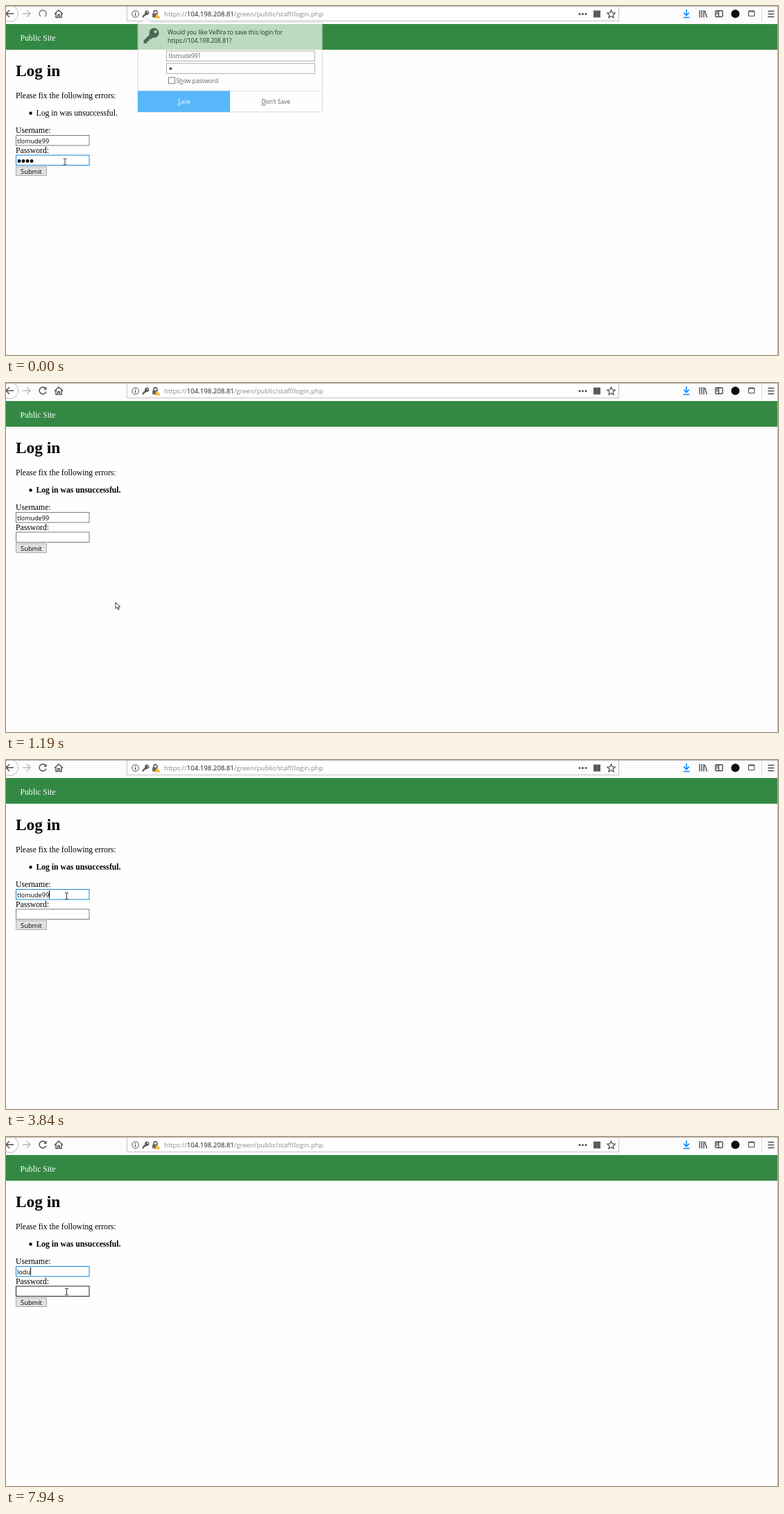
Recreate the animation shown at these times as an HTML page. Size 1113 by 503 pixels, loop 8000 ms.

```html
<!DOCTYPE html>
<html lang="en">
<head>
<meta charset="utf-8">
<title>Log in</title>
<style>
html, body { margin: 0; width: 100%; height: 100%; overflow: hidden; background: #fefefe; }
svg { display: block; width: 1113px; height: 503px; }
text { white-space: pre; }
.serif { font: 11.68px "Liberation Serif", serif; }
.bold { font-weight: bold; }
.sans { font-family: "Open Sans", "Noto Sans", sans-serif; }
.line { fill: none; stroke: #4c4c4f; stroke-width: 1.4; }
.box { fill: #fff; stroke: #858585; }
.under { text-decoration: underline; }
</style>
</head>
<body>
<svg viewBox="0 0 1113 503">
  <defs>
    <g id="key">
      <path fill-rule="evenodd" d="M15 0a7 7 0 0 0-6.500 9.500L0 18v4h5v-3h3v-3h3l2-2.300A7 7 0 1 0 15 0zm2 3.200a2.100 2.100 0 1 1 0 4.200 2.100 2.100 0 0 1 0-4.200z"/>
    </g>
    <clipPath id="selected"><rect id="selClip" x="43" y="147" height="13"/></clipPath>
  </defs>

  <!-- browser toolbar -->
  <rect width="1113" height="26" fill="#fcfcfc"/>
  <circle cx="6" cy="11" r="11.500" fill="#fff" stroke="#bbb"/>
  <path class="line" stroke-width="1.7" d="M11 11H0M5 6L0 11l5 5"/>
  <path class="line" style="stroke:#b9b9bb" d="M24 11h11M30 6l5 5-5 5"/>
  <g id="reload" class="line"><path d="M57.300 8.300A5 5 0 1 0 57.800 12.500"/><path d="M58.500 5.500v4.300h-4.300z" fill="currentColor" stroke="none"/></g>
  <path id="spinner" class="line" style="stroke:#777" d="M50 15A5 5 0 1 1 55.500 15.400"/>
  <path id="stop" class="line" d="M49 7l8 8M57 7l-8 8"/>
  <path class="line" d="M70 11.500L76 6l6 5.500M72 10.500V16.500h2.800V12.500h2.400v4H80v-6"/>
  <rect x="174.500" y="-1" width="709" height="22.500" fill="#fff" stroke="#c4c4c6"/>
  <circle class="line" style="stroke-width:1" cx="186.500" cy="11.500" r="4.800"/>
  <path class="line" d="M186.500 10.800v3.500M186.500 8.400v1.300"/>
  <use href="#key" transform="translate(196.500 6.500) scale(.45)" fill="#58585a"/>
  <path class="line" d="M213 11V9a2.500 2.500 0 0 1 5 0v2"/>
  <rect x="211" y="10.500" width="8" height="6" rx="1" fill="#68686a"/>
  <path d="M218 10.500l4.200 7h-8.400z" fill="#f0a919"/>
  <path d="M218 12.800v2.200M218 15.700v1" stroke="#fff"/>
  <text class="sans" x="228" y="15.200" font-size="9.600" fill="#8a8a8c">https://<tspan fill="#1c1c1e">104.198.208.81</tspan>/green/public/staff/login.php</text>
  <g fill="#4c4c4f"><circle cx="827" cy="11.500" r="1.500"/><circle cx="831.500" cy="11.500" r="1.500"/><circle cx="836" cy="11.500" r="1.500"/></g>
  <rect x="847" y="6.500" width="10" height="10" fill="#5a5a5c"/>
  <path class="line" style="stroke-width:1.200" d="M872.500 6l1.700 3.700 4 .4-3 2.700.9 4-3.600-2.100-3.600 2.100.9-4-3-2.700 4-.4z"/>
  <path class="line" style="stroke:#0a84ff;stroke-width:1.600" d="M981 5v8M977 9.500l4 4 4-4M976.500 16.500h9"/>
  <path class="line" d="M1000 6v10.500M1003 6v10.500M1006 6v10.500M1007.500 7l3 9.500"/>
  <rect class="line" x="1022.700" y="6.700" width="10.500" height="8.800" rx="1.500"/>
  <path class="line" d="M1027.500 7v8.500M1024 9h2.500M1024 11.500h2.500"/>
  <circle cx="1051.500" cy="11.300" r="6" fill="#0c0c0c"/>
  <rect class="line" style="stroke-width:1.100" x="1070.500" y="7" width="8.500" height="7.500" rx="1"/>
  <path d="M1070.500 7.700h8.500" stroke="#4c4c4f" stroke-width="1.500"/>
  <path d="M1089.500 0v22" stroke="#d8d8da"/>
  <path class="line" d="M1098.500 7.500h9M1098.500 11.500h9M1098.500 15.500h9"/>

  <!-- page -->
  <rect y="26" width="1113" height="37" fill="#338943"/>
  <path d="M0 .5H1113M1112.500 0V503" stroke="#b4b4b4"/>
  <g class="serif">
    <text x="20.500" y="50" fill="#fff">Public Site</text>
    <text class="bold" x="14" y="101" style="font-size:23.360px">Log in</text>
    <text x="14" y="132.700">Please fix the following errors:</text>
    <circle cx="35.500" cy="154.500" r="2.200"/>
    <text id="error" x="43.500" y="158">Log in was unsuccessful.</text>
    <g id="selection" clip-path="url(#selected)">
      <rect x="43" y="147" width="123" height="13" fill="#0078d7"/>
      <text class="bold" x="43.500" y="158" fill="#fff">Log in was unsuccessful.</text>
    </g>
    <text x="14" y="183">Username:</text>
    <text x="14" y="212">Password:</text>
  </g>
  <rect id="userBox" class="box" x="14.500" y="186.500" width="105.500" height="14.500"/>
  <text id="user" class="sans" x="16" y="197.500" font-size="9.100"></text>
  <path id="caret" d="M0 188v11.500" stroke="#000"/>
  <rect id="passBox" class="box" x="14.500" y="215" width="105.500" height="14.500"/>
  <g id="dots"></g>
  <rect x="14.500" y="231.500" width="44" height="13" fill="#e1e1e1" stroke="#adadad"/>
  <text class="sans" x="36.500" y="241.500" font-size="9.300" text-anchor="middle">Submit</text>

  <!-- save-login prompt -->
  <g id="popup" class="sans" font-size="8.450" fill="#111">
    <path d="M190 24H195L202 17.500L209 24H456V153.500H190Z" fill="#fff" stroke="#c2c2c4"/>
    <use href="#key" transform="translate(198.500 32.500)" fill="#58585a"/>
    <text x="233" y="42">Would you like Velfira to save this login for</text>
    <text x="233" y="53.500">https://104.198.208.81?</text>
    <rect class="box" x="231.500" y="65.500" width="213.500" height="14.500"/>
    <text id="savedUser" x="234.500" y="75.800" font-size="8.300"></text>
    <rect class="box" x="231.500" y="83.500" width="213.500" height="14.500"/>
    <g id="savedDots"></g>
    <rect class="box" x="234.500" y="103.500" width="9" height="9" style="stroke:#444"/>
    <text x="245.500" y="111.500" font-size="8.300">S<tspan class="under">h</tspan>ow password</text>
    <path d="M190 123.500H456" stroke="#d0d0d2"/>
    <rect x="190" y="123" width="133" height="30.500" fill="#0996f8"/>
    <g text-anchor="middle">
      <text x="256.500" y="142" fill="#fff"><tspan class="under">S</tspan>ave</text>
      <text x="389" y="142"><tspan class="under">D</tspan>on't Save</text>
    </g>
  </g>

  <!-- pointers -->
  <path id="arrow" d="M.5.5V9.700L2.700 7.700L4.200 11L5.700 10.300L4.200 7.200H7Z" fill="#fff" stroke="#222" stroke-width=".9"/>
  <path id="beam" d="M-2.500-4.500H-.5L0-4L.5-4.500H2.500M0-4V4M-2.500 4.500H-.5L0 4L.5 4.500H2.500" fill="none" stroke="#333"/>
</svg>
<script>
const LOOP = 8000;
const NAME = "tlomude99";
const $ = id => document.getElementById(id);

// Each step lists only what changes at that time (ms).
const steps = [
  [0, { icon: "spinner", popup: .68, saved: NAME + "1", savedDots: 1, bold: false, dots: 4,
        user: NAME, caret: false, focus: "passBox", select: 0, pointer: ["beam", 85, 224.5] }],
  [130, { icon: "gray", popup: 0 }],
  [390, { icon: "stop" }],
  [520, { bold: true, dots: 0, focus: "" }],
  [660, { icon: "spinner", pointer: ["arrow", 125, 272] }],
  [790, { icon: "gray", pointer: ["arrow", 157.5, 315.5] }],
  [930, { popup: 1, saved: NAME, savedDots: 4 }],
  [1060, { popup: .68 }],
  [1190, { icon: "dark", popup: 0 }],
  [1320, { pointer: ["arrow", 122, 262] }],
  [1440, { pointer: ["beam", 72, 194] }],
  [1590, { pointer: ["arrow", 46, 173] }],
  [1720, { pointer: ["arrow", 29, 156] }],
  [2120, { pointer: ["beam", 44, 154] }],
  [2250, { pointer: ["beam", 78, 154], select: 35 }],
  [2380, { pointer: ["beam", 122, 155], select: 79 }],
  [2490, { pointer: ["arrow", 170, 155], select: 123 }],
  [2620, { pointer: ["arrow", 198.5, 155] }],
  [2760, { pointer: ["arrow", 200.5, 185] }],
  [3030, { select: 0 }],
  [3290, { pointer: ["arrow", 178, 184] }],
  [3420, { pointer: ["arrow", 135, 187] }],
  [3550, { pointer: ["beam", 98, 194] }],
  [3680, { pointer: ["beam", 87.5, 196] }],
  [3840, { focus: "userBox", caret: true }],
  [4400, { caret: false }],
  [4530, { user: NAME.slice(0, 8), caret: true }],
  [4660, { user: NAME.slice(0, 7) }],
  [4790, { user: NAME.slice(0, 6), caret: false }],
  [4940, { caret: true }],
  [5350, { user: NAME.slice(0, 2) }],
  [5480, { user: "" }],
  [5870, { caret: false }],
  [6150, { user: "l", caret: true }],
  [6410, { user: "lo" }],
  [6540, { user: "lod" }],
  [6840, { user: "lodu", caret: false }],
  [6990, { caret: true }],
  [7400, { caret: false, pointer: ["beam", 87.5, 207] }],
  [7530, { pointer: ["beam", 87.5, 221] }],
  [7660, { pointer: ["arrow", 87, 233] }],
  [7790, { caret: true, pointer: ["beam", 87.5, 227] }],
  [7940, { pointer: ["beam", 87.5, 223] }]
];

const show = (id, on) => { $(id).style.display = on ? "" : "none"; };
const circles = (count, x, y, gap, r) => Array.from({ length: count },
  (_, i) => `<circle cx="${x + i * gap}" cy="${y}" r="${r}"/>`).join("");

function borderColor(id, top, { focus, pointer: [kind, x, y] }) {
  if (focus === id) return "#1a86d0";
  const hover = kind === "beam" && x > 14 && x < 120 && y > top && y < top + 15;
  return hover ? "#222" : "#7d7d7d";
}

function draw(s) {
  show("reload", s.icon === "gray" || s.icon === "dark");
  $("reload").style.stroke = $("reload").style.color = s.icon === "gray" ? "#b9b9bb" : "#4c4c4f";
  show("spinner", s.icon === "spinner");
  show("stop", s.icon === "stop");

  $("popup").style.opacity = s.popup;
  $("popup").setAttribute("transform", `translate(0 ${s.popup < 1 ? -.7 : 0})`);
  $("savedUser").textContent = s.saved;
  $("savedDots").innerHTML = circles(s.savedDots, 237.3, 91, 5.5, 2);

  $("error").classList.toggle("bold", s.bold);
  show("selection", s.select > 0);
  $("selClip").setAttribute("width", s.select);

  $("userBox").style.stroke = borderColor("userBox", 186, s);
  $("passBox").style.stroke = borderColor("passBox", 215, s);
  $("dots").innerHTML = circles(s.dots, 19, 223.5, 6, 2.4);
  $("user").textContent = s.user;
  show("caret", s.caret);
  const end = s.user ? $("user").getComputedTextLength() : 0;
  $("caret").setAttribute("transform", `translate(${Math.round(16 + end) + .5} 0)`);

  const [kind, x, y] = s.pointer;
  show("arrow", kind === "arrow");
  show("beam", kind === "beam");
  $(kind).setAttribute("transform", `translate(${x} ${y})`);
}

const start = performance.now();
let shown = -1;
function frame() {
  const time = (performance.now() - start) % LOOP;
  const count = steps.filter(([at]) => at <= time).length;
  if (count !== shown) {
    draw(Object.assign({}, ...steps.slice(0, count).map(step => step[1])));
    shown = count;
  }
  requestAnimationFrame(frame);
}
frame();
</script>
</body>
</html>
```
